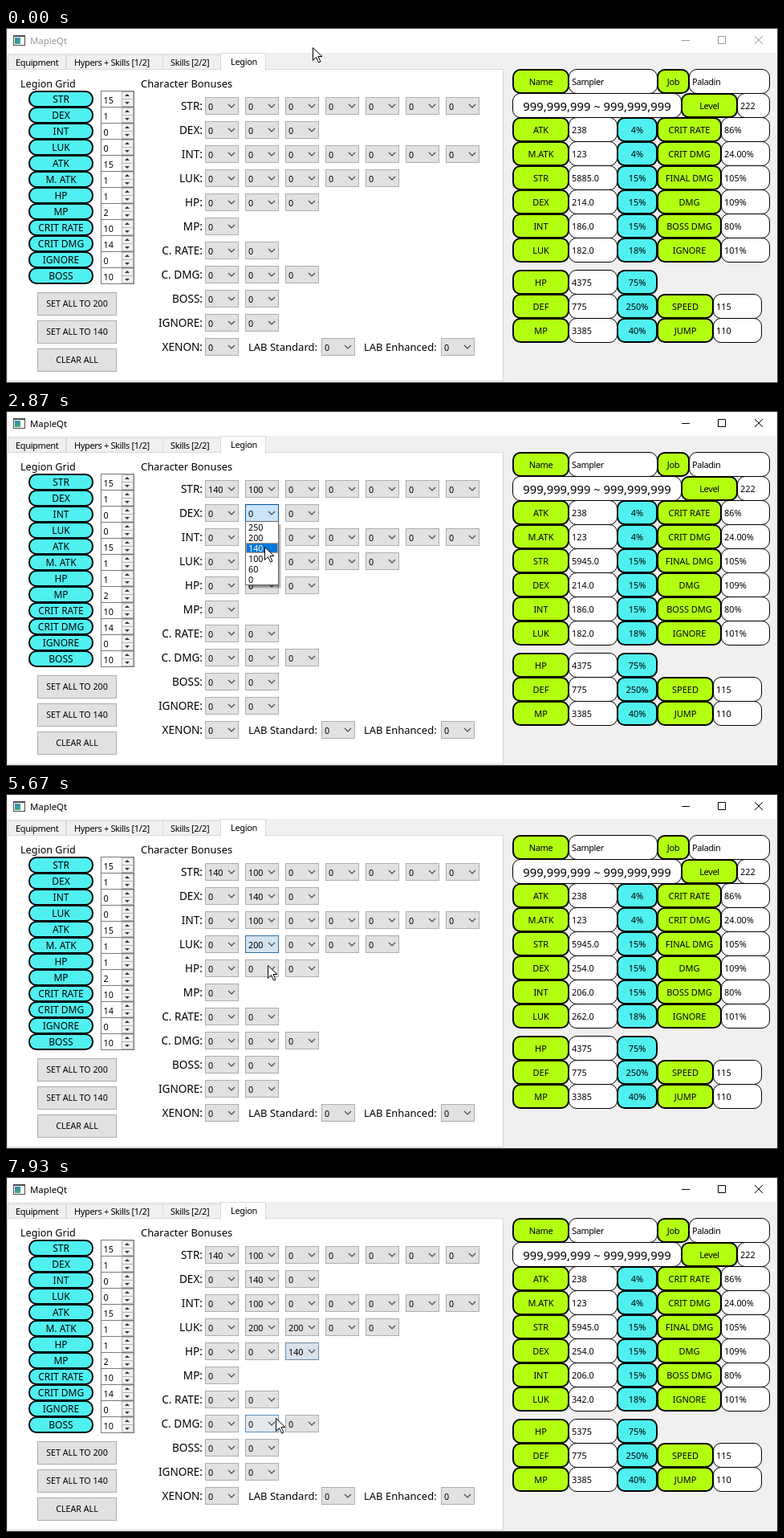
These frames come from a looping animation (962 by 442 pixels, 8000 ms). An HTML page:

```html
<!DOCTYPE html>
<html lang="en">
<head>
<meta charset="utf-8">
<title>Legion planner</title>
<style>
  html, body { margin: 0; width: 100%; height: 100%; overflow: hidden; background: #f0f0f0; }
  svg { display: block; width: 962px; height: 442px; font-family: "Noto Sans", "Open Sans", sans-serif; }
  .tight { letter-spacing: -.35px; }
</style>
</head>
<body>
<svg id="stage" viewBox="0 0 962 442">
  <defs>
    <linearGradient id="icon" x2="1" y2="1">
      <stop offset="0" stop-color="#2f7fb8"/><stop offset="1" stop-color="#43b37c"/>
    </linearGradient>
  </defs>
  <g id="fixed"></g>
  <g id="live"></g>
</svg>
<script>
const LIME = '#b2ff12', AQUA = '#50f0f0';
const LOOP = 8000, TICK = 200 / 3, SLIDE = 150, FADE = 400;
const fixed = document.getElementById('fixed');
const live = document.getElementById('live');

const rect = (x, y, w, h, fill, stroke = 'none', extra = '') =>
  `<rect x="${x}" y="${y}" width="${w}" height="${h}" fill="${fill}" stroke="${stroke}" ${extra}/>`;
// One-pixel border drawn inside the given box
const box = (x, y, w, h, fill, stroke, extra) => rect(x + .5, y + .5, w - 1, h - 1, fill, stroke, extra);
const line = (d, stroke, width = 1) => `<path d="${d}" fill="none" stroke="${stroke}" stroke-width="${width}"/>`;
const text = (s, x, y, size = 11, anchor = 'start', fill = '#000', cls = '') =>
  `<text x="${x}" y="${y}" font-size="${size}" text-anchor="${anchor}" fill="${fill}" class="${cls}">${s}</text>`;

const pill = (s, x, y, w, h, fill, size = 11, cls = '') =>
  rect(x + 1, y + 1, w - 2, h - 2, fill, '#000', 'stroke-width="2" rx="9"') +
  text(s, x + w / 2, y + Math.ceil(h / 2) + 4, size, 'middle', '#000', cls);
const field = (s, x, y, w, cls = '') =>
  box(x, y, w, 31, '#fff', '#000', 'rx="9.5"') + text(s, x + 4, y + 20, 10.9, 'start', '#000', cls);

function combo(x, y, value = 0, fill = '#e1e1e1', stroke = '#adadad') {
  return box(x, y, 42, 22, fill, stroke) + text(value, x + 4, y + 16, 10.8) +
    line(`M${x + 29} ${y + 9}l4 4l4 -4`, '#444', 1.1);
}

function spin(value, y) {
  const arrow = (cy, d) => `<path d="M148 ${cy + d}h6l-3 ${-3 * d}z" fill="#333"/>`;
  return box(118, y, 42, 21, '#fff', '#7a7a7a') + text(value, 121.5, y + 16, 10.8) +
    box(144, y + 1, 15, 10, '#f0f0f0', '#b8b8b8') + box(144, y + 10, 15, 10, '#f0f0f0', '#b8b8b8') +
    arrow(y + 6, 1) + arrow(y + 15, -1);
}

const button = (s, y) => box(39, y, 99, 29, '#e1e1e1', '#adadad') + text(s, 88.5, y + 18, 10.7, 'middle');

const tab = (s, x, w) => box(x, 33, w, 19, '#f0f0f0', '#d9d9d9') + text(s, x + 10, 47, 11, 'start', '#000', 'tight');

function drawFixed() {
  let out = rect(0, 0, 962, 442, '#f0f0f0') + rect(0, 0, 962, 31, '#fff');
  out += rect(9, 9, 15, 13, '#4a4a4a') + rect(10, 11, 13, 10, '#fff') + rect(11, 12, 7, 8, 'url(#icon)');

  out += tab('Equipment', 2, 73) + tab('Hypers + Skills [1/2]', 75, 121) + tab('Skills [2/2]', 195, 73);
  out += box(1, 51, 619, 389, '#fff', '#d9d9d9');
  out += box(267, 31, 57, 22, '#fff', '#d9d9d9') + rect(268, 51, 55, 3, '#fff');
  out += text('Legion', 280, 46, 11, 'start', '#000', 'tight');

  out += text('Legion Grid', 18, 74, 12.6) + text('Character Bonuses', 168, 74, 12.9);
  const grid = { STR: 15, DEX: 1, INT: 0, LUK: 0, ATK: 15, 'M. ATK': 1, HP: 1, MP: 2,
    'CRIT RATE': 10, 'CRIT DMG': 14, IGNORE: 0, BOSS: 10 };
  Object.entries(grid).forEach(([name, value], i) => {
    const y = 78 + 20 * i;
    out += pill(name, 28, y, 81, 21, AQUA, 12) + spin(value, y);
  });
  out += button('SET ALL TO 200', 329) + button('SET ALL TO 140', 364) + button('CLEAR ALL', 399);

  const bonuses = { STR: 7, DEX: 3, INT: 7, LUK: 5, HP: 3, MP: 1, 'C. RATE': 2, 'C. DMG': 3,
    BOSS: 2, IGNORE: 2, XENON: 1 };
  Object.entries(bonuses).forEach(([name, count], row) => {
    const y = 86 + 30 * row;
    out += text(name + ':', 245, y + 16, 13.6, 'end');
    for (let i = 0; i < count; i++) out += combo(248 + 50 * i, y);
  });
  out += text('LAB Standard:', 302, 402, 13) + combo(393, 386);
  out += text('LAB Enhanced:', 446, 402, 13) + combo(542, 386);

  out += pill('Name', 631, 51, 71, 31, LIME, 11, 'tight') + field('Sampler', 701, 51, 111, 'tight');
  out += pill('Job', 811, 51, 41, 31, LIME, 11, 'tight') + field('Paladin', 851, 51, 101, 'tight');
  out += box(631, 81, 211, 31, '#fff', '#000', 'rx="9.5"');
  out += text('999,999,999 ~ 999,999,999', 736.5, 103, 14.8, 'middle');
  out += pill('Level', 841, 81, 71, 31, LIME, 11, 'tight') + field('222', 911, 81, 41);

  // label, value (blank when it changes), percent, second label, its value, second label width
  const stats = [
    ['ATK', '238', '4%', 'CRIT RATE', '86%', 81], ['M.ATK', '123', '4%', 'CRIT DMG', '24.00%', 81],
    ['STR', '', '15%', 'FINAL DMG', '105%', 81], ['DEX', '', '15%', 'DMG', '109%', 81],
    ['INT', '', '15%', 'BOSS DMG', '80%', 81], ['LUK', '', '18%', 'IGNORE', '101%', 81], null,
    ['HP', '', '75%'], ['DEF', '775', '250%', 'SPEED', '115', 71], ['MP', '3385', '40%', 'JUMP', '110', 71]
  ];
  stats.forEach((stat, i) => {
    if (!stat) return;
    const [name, value, percent, name2, value2, w] = stat;
    const y = 111 + 30 * i - (i > 6 ? 20 : 0);
    out += pill(name, 631, y, 71, 31, LIME) + field(value, 701, y, 61) + pill(percent, 761, y, 51, 31, AQUA);
    if (name2) out += pill(name2, 811, y, w, 31, LIME) + field(value2, 810 + w, y, 61);
  });
  return out;
}

const ITEMS = [250, 200, 140, 100, 60, 0];
const picks = [
  { x: 248, y: 86, hover: 760, open: 860, pick: 1180, value: 140 },
  { x: 298, y: 86, hover: 1380, open: 1484, pick: 2200, value: 100 },
  { x: 298, y: 116, hover: 2400, open: 2520, pick: 3270, value: 140 },
  { x: 298, y: 146, hover: 3490, open: 3610, pick: 4080, value: 100 },
  { x: 298, y: 176, hover: 4930, open: 5060, pick: 5550, value: 200 },
  { x: 348, y: 176, hover: 5850, open: 6130, pick: 6600, value: 200 },
  { x: 348, y: 206, hover: 6830, open: 6990, pick: 7690, value: 140 }
];
const passes = [
  { x: 298, y: 176, from: 3370, to: 3500 },
  { x: 298, y: 206, from: 4600, to: 4860 },
  { x: 298, y: 296, from: 7850, to: LOOP }
];
// Time of change and new text, by text baseline
const counters = [
  [191, [0, '5885.0'], [1180, '5925.0'], [2200, '5945.0']],
  [221, [0, '214.0'], [3270, '254.0']],
  [251, [0, '186.0'], [4080, '206.0']],
  [281, [0, '182.0'], [5550, '262.0'], [6600, '342.0']],
  [321, [0, '4375'], [7690, '5375']]
];
const path = [
  [0, 382, 24], [330, 382, 24], [760, 270, 96], [870, 268, 100], [1120, 268, 142], [1190, 269, 142],
  [1460, 316, 102], [1600, 318, 107], [2060, 320, 154], [2210, 320, 155], [2440, 322, 128],
  [2540, 322, 131], [2870, 322, 169], [3280, 321, 170], [3420, 319, 183], [3533, 319, 157],
  [3640, 318, 161], [3950, 317, 214], [4100, 317, 214], [4650, 311, 212], [4800, 310, 209],
  [4980, 312, 190], [5080, 313, 191], [5400, 316, 218], [5570, 317, 218], [5930, 368, 189],
  [6150, 368, 190], [6467, 370, 212], [6620, 370, 215], [6860, 367, 214], [7010, 366, 217],
  [7350, 366, 260], [7700, 365, 262], [7800, 350, 300], [7933, 336, 300], [8000, 335, 300]
];

const clamp = v => Math.max(0, Math.min(1, v));
const NORMAL = [[225, 225, 225], [173, 173, 173]];
const HOVER = [[229, 241, 251], [0, 120, 215]];
const PRESSED = [[204, 228, 247], [0, 84, 153]];
const mix = (a, b, k) => a.map((c, i) => c.map((v, j) => v + (b[i][j] - v) * k));
const paint = look => look.map(c => `rgb(${c.map(Math.round)})`);

function cursorAt(t) {
  const i = Math.max(1, path.findIndex(p => p[0] >= t));
  const [t0, x0, y0] = path[i - 1], [t1, x1, y1] = path[i];
  const k = clamp((t - t0) / (t1 - t0)), e = k * k * (3 - 2 * k);
  return [Math.round(x0 + (x1 - x0) * e), Math.round(y0 + (y1 - y0) * e)];
}

function pickLook(p, t) {
  if (t < p.hover) return NORMAL;
  if (t < p.open) return mix(NORMAL, HOVER, clamp((t - p.hover) / 120));
  if (t < p.pick) return mix(HOVER, PRESSED, clamp((t - p.open - SLIDE) / 100));
  return mix(PRESSED, NORMAL, clamp((t - p.pick) / FADE));
}

function popup(p, t, cy) {
  const height = Math.round(80 * clamp((t - p.open) / SLIDE));
  if (height < 2) return '';
  const top = p.y + 21, done = height === 80;
  const row = Math.floor((cy - top - 1) / 13);
  const current = done && row >= 0 && row < 6 ? row : 5;
  let out = '';
  if (done) {
    for (let i = 1; i < 5; i++) out += rect(p.x + 4, top + 4, 37 + i, 76 + i, '#000', 'none', 'opacity=".13"');
  }
  out += box(p.x, top, 42, height, '#fff', '#646464');
  ITEMS.forEach((item, i) => {
    const y = top + 1 + 13 * i - (80 - height);
    if (y < top - 3) return;
    const lit = done && i === current;
    if (lit) out += box(p.x + 1, y, 40, 13, '#0078d7', '#ff8728', 'stroke-dasharray="1 1"');
    else if (!done && i === 5 && y > top) out += rect(p.x + 1, y, 40, 13, '#f0f0f0');
    out += text(item, p.x + 4, y + 11, 10.8, 'start', lit ? '#fff' : '#000');
  });
  return out;
}

function chrome(active) {
  const ink = active ? '#000' : '#999';
  return box(0, 0, 962, 442, 'none', active ? '#1c1c1c' : '#484848') +
    text('MapleQt', 30, 20, 11.4, 'start', ink) +
    line('M842 15.5h10M887.5 10.5h9v9h-9zM933 10l10 10M943 10l-10 10', ink);
}

function draw(t) {
  const [cx, cy] = cursorAt(t);
  let out = chrome(t >= 330);
  for (const p of passes) {
    const k = t < p.to ? clamp((t - p.from) / 180) : 1 - clamp((t - p.to - 60) / 130);
    if (k > 0) out += combo(p.x, p.y, 0, ...paint(mix(NORMAL, HOVER, k)));
  }
  for (const p of picks) {
    if (t >= p.hover) out += combo(p.x, p.y, t < p.pick ? 0 : p.value, ...paint(pickLook(p, t)));
  }
  for (const [y, ...steps] of counters) {
    out += text(steps.filter(s => s[0] <= t).pop()[1], 705, y, 10.9);
  }
  for (const p of picks) if (t >= p.open && t < p.pick) out += popup(p, t, cy);
  out += `<path transform="translate(${cx + .5} ${cy + .5})" d="M0 0v16l4 -4l3 6.5l2.5 -1l-3 -6.5h5z" fill="#fff" stroke="#000"/>`;
  live.innerHTML = out;
}

fixed.innerHTML = drawFixed();
const start = performance.now();
let shown = -1;
function frame() {
  const t = (performance.now() - start) % LOOP;
  const step = Math.floor((t + 4) / TICK) % 120;
  if (step !== shown) draw((shown = step) * TICK);
  requestAnimationFrame(frame);
}
frame();
</script>
</body>
</html>
```
